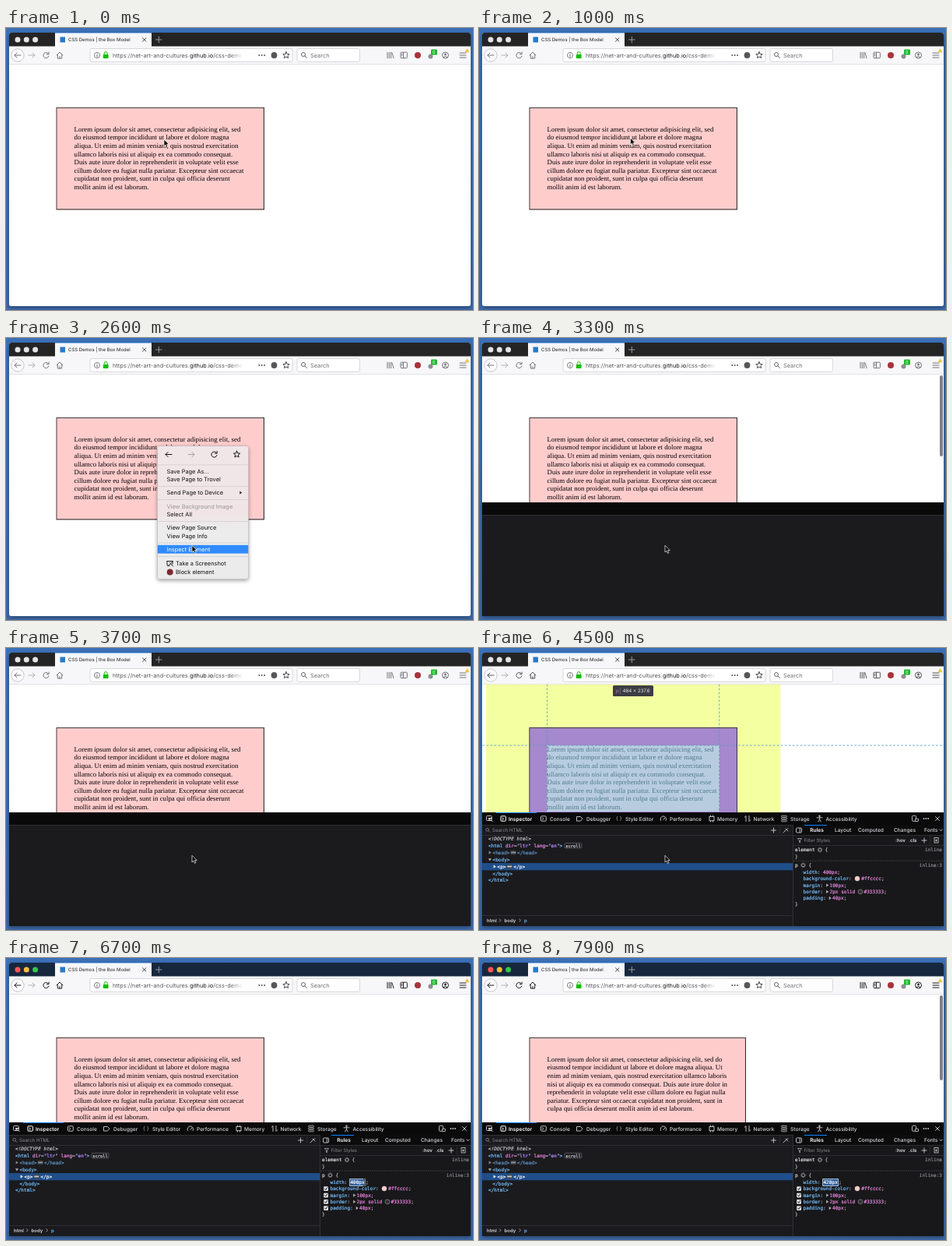
Animation, 600 px wide and 362 px high, one loop 8000 ms. Source, as an HTML page:

```html
<!DOCTYPE html>
<html lang="en">
<head>
<meta charset="utf-8">
<title>Box model inspector</title>
<style>
html, body { margin: 0; width: 100%; height: 100%; overflow: hidden; background: #3d70b6; }
svg {
  display: block; width: 600px; height: 362px;
  --ink: #75757a; --bar: #242425; --close: #e4e4e6; --minimize: #e4e4e6; --zoom: #e4e4e6;
}
svg.ready { --ink: #55555a; }
svg.active { --ink: #1f1f23; --bar: #17283e; --close: #fc5652; --minimize: #fdbc3f; --zoom: #33c748; }
text { font-family: Inter, Roboto, sans-serif; white-space: pre; text-rendering: geometricPrecision; stroke-width: 0; }
.mono { font-family: "DejaVu Sans Mono", monospace; stroke-width: .2px; }
.line { fill: none; stroke-width: 1; stroke-linecap: round; stroke-linejoin: round; }
#para {
  width: 400px; padding: 40px; border: 2px solid #333; background: #fcc; color: #000;
  font: 16px/1.2 "Liberation Serif", Times, serif; text-rendering: geometricPrecision;
}
</style>
</head>
<body>
<svg id="stage" viewBox="0 0 600 362" xmlns="http://www.w3.org/2000/svg"></svg>
<script>
const LOOP = 8000;
const MENU = [1300, 2700], PANEL = 2800, READY = 3900, OVERLAY = [4000, 5200];
const CHECKS = 5700, EDIT = 6400, TYPING = 6900, REPEAT = 7300;

const stage = document.getElementById('stage');
const $ = id => document.getElementById(id);

const text = (x, mid, str, size, fill, extra = '') =>
  `<text x="${x}" y="${mid + size * .36}" font-size="${size}" fill="${fill}" ${extra}>${str}</text>`;
const rect = (x, y, w, h, fill, extra = '') =>
  `<rect x="${x}" y="${y}" width="${w}" height="${h}" fill="${fill}" ${extra}/>`;
const dot = (x, y, r, fill, extra = '') => `<circle cx="${x}" cy="${y}" r="${r}" fill="${fill}" ${extra}/>`;
const line = (d, color, extra = '') => `<path class="line" d="${d}" stroke="${color}" ${extra}/>`;
const group = (id, body, extra = '') => `<g id="${id}" ${extra}>${body}</g>`;
const mono = (x, mid, str, fill = '#b1b1b3', extra = '') =>
  text(x, mid, str, 6.08, fill, `class="mono" stroke="${fill}" ${extra}`);
const tint = (color, str) => `<tspan fill="${color}" stroke="${color}">${str}</tspan>`;
const tag = str => tint('#75bfff', str);
const pink = str => tint('#f086e2', str);
const at = (x, y, body) => `<g transform="translate(${x} ${y})">${body}</g>`;

const arrow = (x, y, dir, color) =>
  at(x, y, line(`M${-4 * dir} 0H${4 * dir}M${dir} -3L${4 * dir} 0L${dir} 3`, color));
const reload = (x, y, color) =>
  at(x, y, line('M3 -2A3.6 3.6 0 1 0 3.5 1M3.6 -4V-1.4H1', color));
const star = (x, y, color) => {
  const points = Array.from({ length: 10 }, (_, i) => {
    const a = i * Math.PI / 5 - Math.PI / 2, r = i % 2 ? 2 : 4.4;
    return `${(r * Math.cos(a)).toFixed(2)} ${(r * Math.sin(a)).toFixed(2)}`;
  });
  return at(x, y, line(`M${points.join('L')}Z`, color));
};
const lens = (x, y, s, color) =>
  at(x, y, `<g transform="scale(${s})">${dot(-1, -1, 2.5, 'none', `stroke="${color}"`)}${line('M1 1L3.5 3.5', color)}</g>`);
const gear = (x, y) => dot(x, y, 2, 'none', 'stroke="#a0a0a5" stroke-width="1"') +
  dot(x, y, 2.9, 'none', 'stroke="#a0a0a5" stroke-width=".8" stroke-dasharray="1 1.27"');
const twisty = (x, y, open, color = '#b1b1b3') =>
  `<path transform="translate(${x} ${y})" d="${open ? 'M-2 -1.3H2L0 1.8Z' : 'M-1.3 -2.2V2.2L1.8 0Z'}" fill="${color}"/>`;
const dots = (x, y, gap, color) => [-1, 0, 1].map(i => dot(x + i * gap, y, 1, color)).join('');

function browserChrome() {
  const ink = 'var(--ink)';
  return rect(4, 6, 593, 351, '#fff', 'rx="3" filter="url(#shadow)"') +
    `<path d="M4 25V9q0-3 3-3H594q3 0 3 3V25Z" fill="var(--bar)"/>` +
    ['close', 'minimize', 'zoom'].map((name, i) => dot(15 + i * 11.3, 15, 3.5, `var(--${name})`)).join('') +
    rect(63, 6, 124, 18.5, '#f7f7f9') + rect(63, 6, 124, 1, '#8fbdf0') +
    rect(69.5, 11.5, 6.5, 7, '#2879c9') +
    text(80, 15, 'CSS Demos | the Box Model', 6, '#1c1c1f') +
    line('M175.5 12.8L180 17.2M180 12.8L175.5 17.2', '#444', 'stroke-width=".9"') +
    line('M192.5 15H200M196.3 11.2V18.8', '#96989c') +
    rect(4, 23.5, 593, 23, '#f7f7f9') + rect(4, 46, 593, .6, '#d4d4d8') +
    dot(15, 35, 8.2, '#fcfcfd', 'stroke="#bcbcc2" stroke-width=".8"') + arrow(15, 35, -1, ink) +
    arrow(33, 35, 1, '#b0b0b5') + reload(51.5, 35, ink) +
    line('M65 35L69 31L73 35M66.3 34.5V39H71.7V34.5M69 39V36.5', ink) +
    rect(108, 26.5, 260, 16.8, '#fff', 'rx="2" stroke="#cfcfd4" stroke-width=".8"') +
    dot(117, 35, 3.6, 'none', 'stroke="#74747a" stroke-width=".9"') + line('M117 34.7V37M117 33V33.1', '#66666c') +
    line('M126.2 34V32.5a2 2 0 0 1 4 0V34', '#12bc00', 'stroke-width="1.2"') + rect(124.8, 34, 6.8, 5, '#12bc00', 'rx=".8"') +
    `<g clip-path="url(#urlClip)">` +
    text(137, 35, `https://net-art-and-cultures.${tint('#1c1c20', 'github.io')}/css-demos`, 7.4, '#58585e') + `</g>` +
    rect(288, 28, 17, 14, 'url(#fade)') +
    dots(328.7, 35, 3.4, '#55555a') + dot(344.5, 35, 3.9, '#55555a') + star(360, 35, '#4a4a50') +
    rect(374, 26.5, 80.5, 16.8, '#fff', 'rx="2" stroke="#cfcfd4" stroke-width=".8"') +
    lens(383, 35, 1, '#66666c') + text(391, 35, 'Search', 7.4, '#707076') +
    line('M490 31.3V38.7M492.3 31.3V38.7M494.6 31.3V38.7M496 31.8L498 38.7', ink, 'stroke-width="1.1"') +
    rect(507, 31.2, 8.4, 7.4, 'none', `rx="1" stroke="${ink}" stroke-width="1"`) + line('M510.5 31.5V38.5M508.2 33.5H509M508.2 35.3H509', ink) +
    dot(529, 35, 4, '#a8323a') +
    dot(545.5, 36.5, 3, '#8e8e93') + rect(546, 27.5, 8, 7, '#1fb82c', 'rx="1"') + text(548, 31, '0', 5.5, '#fff') +
    dot(564.5, 35, 4, 'none', `stroke="${ink}" stroke-width="1"`) + dot(564.5, 34, 1.4, ink) + line('M562.2 37.4q2.3-2 4.6 0', ink) +
    line('M583 32H591M583 35H591M583 38H591', ink, 'stroke-width="1.1"') +
    `<path d="M592.5 26L595.5 31.3H589.5Z" fill="#f2c343"/>`;
}

const lorem = 'Lorem ipsum dolor sit amet, consectetur adipisicing elit, sed do eiusmod tempor incididunt ut labore et dolore magna aliqua. Ut enim ad minim veniam, quis nostrud exercitation ullamco laboris nisi ut aliquip ex ea commodo consequat. Duis aute irure dolor in reprehenderit in voluptate velit esse cillum dolore eu fugiat nulla pariatur. Excepteur sint occaecat cupidatat non proident, sunt in culpa qui officia deserunt mollit anim id est laborum.';

// Page contents are laid out in CSS pixels and scaled down.
function page() {
  const box = (x, y, w, h) => `M${x} ${y}h${w}v${h}h${-w}Z`;
  const rings = [box(8, 0, 684, 437.6), box(108, 100, 484, 237.6), box(110, 102, 480, 233.6), box(150, 142, 400, 153.6)];
  const fills = ['#edff64', '#444', '#6a5acd', '#87ceeb'];
  const overlay = rings.map((d, i) =>
    `<path d="${d}${rings[i + 1] || ''}" fill="${fills[i]}" fill-rule="evenodd"/>`).join('') +
    `<path d="M150 0V300M550 0V300M0 142H1074" fill="none" stroke="#0077b8" stroke-width="1.8" stroke-dasharray="5 4"/>`;
  return `<g clip-path="url(#pageClip)"><g transform="translate(4.6 46.5) scale(.553)">
    <foreignObject x="108" y="100" width="700" height="400"><div xmlns="http://www.w3.org/1999/xhtml" id="para">${lorem}</div></foreignObject>
    ${group('overlay', overlay, 'opacity=".6"')}</g></g>` +
    group('tip', rect(172, 48, 52, 14, '#3c3d42', 'rx="1.5"') + text(176, 55, 'p', 6.2, '#d36ee0') +
      rect(181, 51, .6, 8, '#77777c') + text(184.5, 55, '484 × 237.6', 6.2, '#eee')) +
    rect(592, 48, 4, 104, '#808084', 'id="thumb" rx="2"');
}

const menuRows = [
  [171, 'Save Page As…'], [181.6, 'Save Page to Trovel'], [198.6, 'Send Page to Device'],
  [216, 'View Background Image', 'off'], [226.5, 'Select All'], [243.6, 'View Page Source'],
  [254.2, 'View Page Info'], [271.2, 'Inspect Element'], [289, 'Take a Screenshot', 'icon'], [300.5, 'Block element', 'icon']
];

function menu() {
  const rows = menuRows.map(([y, label, kind], i) =>
    rect(194.8, y - 5.4, 116.4, 10.8, '#2f8bff', `id="hot${i}"`) +
    text(kind === 'icon' ? 218 : 206.5, y, label, 7.4, kind === 'off' ? '#98959a' : '#111', `id="row${i}"`)).join('');
  const rules = [162.5, 190, 207, 235, 262.6, 280].map(y => rect(195, y, 116, .8, '#d2ced1')).join('');
  return rect(194.5, 138.5, 117, 171, 'url(#menuFill)', 'rx="3" stroke="#b5b0b3" stroke-width=".6" filter="url(#shadow)"') +
    arrow(209, 149.5, -1, '#111') + arrow(238, 149.5, 1, '#a5a0a4') + reload(267.5, 149.5, '#111') + star(296.5, 149.5, '#111') +
    rules + rows + twisty(301.5, 198.6, false, '#333') +
    line('M207 286.5H214V290M207 286.5V292H210M208.5 293L214.5 286.5M210.5 288.5L214.5 293', '#222') +
    dot(210.7, 300.5, 4, '#7d2a30');
}

function toolbox() {
  const soft = '#d7d7db', icon = '#bcbcc0';
  const tabs = [[91, 'Console'], [138, 'Debugger'], [188, 'Style Editor'], [245, 'Performance'],
    [306, 'Memory'], [352.5, 'Network'], [400, 'Storage'], [445.5, 'Accessibility']];
  const tabIcons = rect(9.5, 215.5, 7, 6, 'none', `rx="1" stroke="${icon}"`) + line('M13 218.5L17 222.5M13 218.5V221.5M13 218.5H16', '#fff') +
    rect(28, 215.8, 6.4, 6.4, 'none', 'rx="1" stroke="#fff"') + line('M30 218L31.5 219.2L30 220.5', '#fff') +
    rect(79.5, 215.8, 6.8, 6.4, 'none', `rx="1" stroke="${icon}"`) + line('M81.3 217.8L83 219.2L81.3 220.6', icon) +
    `<path d="M125.5 216.5H130.5L133 219.2L130.5 222H125.5Z" fill="none" stroke="${icon}"/>` +
    text(176, 219, '{ }', 6.6, icon) +
    line('M233.5 221.5A3.8 3.8 0 1 1 240.2 221.5M237 220.5L239 217.8', icon) +
    rect(296, 216.5, 6, 5.2, 'none', `stroke="${icon}"`) + line('M297.5 215V216M300.5 215V216M297.5 222V223M300.5 222V223', icon) +
    line('M343 222.5V215.5L341.3 217.2M347 215.5V222.5L348.7 220.8', icon) +
    [216.2, 219, 221.8].map(y => rect(388.5, y - 1, 7, 2, 'none', `rx="1" stroke="${icon}" stroke-width=".8"`)).join('') +
    dot(437.5, 215.7, 1.2, icon) + line('M434 217.8H441M437.5 218V220L435.7 223M437.5 220L439.3 223', icon);
  const header = rect(22, 211, 52, 1, '#0a84ff') + tabIcons +
    text(38, 219.2, 'Inspector', 6.6, '#fff', 'font-weight="600"') +
    tabs.map(([x, label]) => text(x, 219.2, label, 6.6, soft, 'font-weight="500"')).join('') +
    rect(556.5, 215.3, 5, 7, 'none', `rx="1" stroke="${icon}"`) + rect(560.5, 219.3, 4, 3.2, '#0a0a0b', `rx=".6" stroke="${icon}"`) +
    dots(574.3, 219, 2.8, icon) + line('M586.5 216.5L591.5 221.5M591.5 216.5L586.5 221.5', icon);

  const badge = (x, y) => rect(x, y - 2.6, 7.4, 5.2, '#4a4a50', 'rx="1"') + dots(x + 3.7, y, 1.9, '#ddd');
  const tree = rect(4, 240, 399, .7, '#38383d') + lens(11.5, 234, .75, '#8a8a90') + text(17, 233.8, 'Search HTML', 6.1, '#8a8a90') +
    line('M375.5 234H381.5M378.5 231V237', icon) + rect(386, 229, .6, 9, '#38383d') +
    line('M391 237L394.5 233.5', icon) + line('M394 232L397 235M395.5 233L396.8 231.7', icon, 'stroke-width="1.7"') +
    mono(12, 244.9, '&lt;!DOCTYPE html&gt;', '#c9c9cd', 'font-style="italic"') +
    mono(12, 253.6, `${tag('&lt;html')} ${pink('dir')}=${tint('#b98eff', '"ltr"')} ${pink('lang')}=${tint('#b98eff', '"en"')}${tag('&gt;')}`) +
    rect(110, 250.4, 22, 6.6, 'none', 'rx="1.5" stroke="#77777c" stroke-width=".6"') + mono(111.2, 253.6, 'scroll', '#d7d7db', 'style="font-size:5.4px"') +
    `<g opacity=".72">${twisty(14, 262.6)}${mono(17.5, 262.6, tag('&lt;head&gt;'))}${badge(40.5, 262.6)}${mono(49, 262.6, tag('&lt;/head&gt;'))}</g>` +
    twisty(14, 271.6, true) + mono(17.5, 271.6, tag('&lt;body&gt;')) +
    rect(4, 276.1, 399, 9.2, '#204e8a') + twisty(20, 280.6, false, '#fff') + mono(23.5, 280.6, '&lt;p&gt;', '#fff') + badge(35.5, 280.6) + mono(44.5, 280.6, '&lt;/p&gt;', '#fff') +
    mono(17.5, 289.4, tag('&lt;/body&gt;')) + mono(12, 298.1, tag('&lt;/html&gt;')) +
    rect(4, 343, 399, .7, '#38383d') +
    [[10, 'html', soft], [32.5, 'body', soft], [58, 'p', '#75bfff']].map(([x, s, c]) => text(x, 349.5, s, 6, c, 'font-weight="600"')).join('') +
    [26.5, 52].map(x => line(`M${x} 347.8L${x + 1.5} 349.5L${x} 351.2`, '#a0a0a5', 'stroke-width=".8"')).join('');

  const sideTabs = [[457, 'Layout'], [487, 'Computed'], [533, 'Changes'], [572, 'Fonts']];
  const prop = (y, name) => mono(416.5, y, `${tag(name)}:`);
  const rules = rect(403, 227, 194, 130, '#18181a') + rect(404, 227, 193, 13, '#0c0c0d') +
    rect(403, 227, .8, 130, '#38383d') + rect(404, 240, 193, .7, '#38383d') + rect(404, 253, 193, .7, '#38383d') +
    rect(418, 227, 29, 1, '#0a84ff') +
    rect(407.5, 231, 7, 6, 'none', `rx="1" stroke="${icon}"`) + line('M412.3 231.5V236.5', icon) +
    text(425.3, 234, 'Rules', 6.6, '#fff', 'font-weight="600"') +
    sideTabs.map(([x, s]) => text(x, 234, s, 6.6, soft, 'font-weight="500"')).join('') +
    line('M592 233L593.6 234.8L595.2 233', icon, 'stroke-width=".9"') +
    line('M409.5 244.5H414.5L412.6 247V250L411.4 249.3V247Z', '#8a8a90', 'stroke-width=".8"') + text(417.5, 247, 'Filter Styles', 6, '#8a8a90') +
    text(535, 247, ':hov', 6.1, '#e4e4e6', 'font-weight="600"') + text(552, 247, '.cls', 6.1, '#e4e4e6', 'font-weight="600"') +
    line('M569 247H575M572 244V250', icon) + rect(579, 242, .6, 10, '#38383d') +
    rect(585, 243.5, 5, 6.5, 'none', `stroke="${icon}" stroke-width=".9"`) + line('M586.5 247H588.5M587.5 246V248', icon, 'stroke-width=".7"') +
    mono(406, 259.3, 'element', soft) + gear(438, 259.1) + mono(444.5, 259.3, '{') + mono(595, 259.3, 'inline', '#86868c', 'text-anchor="end"') + mono(406, 267.5, '}') +
    `<path d="M404 273.2H597" stroke="#45454a" stroke-width=".8" stroke-dasharray="2 1"/>` +
    mono(406, 279, 'p', soft) + gear(416.5, 278.8) + mono(423.5, 279, '{') + mono(595, 279, 'inline:3', '#86868c', 'text-anchor="end"') +
    prop(288, 'width') +
    group('value', mono(442, 288, `${pink('400px')};`)) +
    group('editor', rect(441.7, 283.7, 20, 8.8, '#2f609f', 'stroke="#d3dde9" stroke-width=".8"') +
      mono(442.4, 288, '400px', '#fff', 'id="typed"') + mono(462.3, 288, ';')) +
    prop(296.2, 'background-color') + dot(486, 296, 3, '#fcc', 'stroke="#ddd" stroke-width=".5"') + mono(491.3, 296.2, `${pink('#ffcccc')};`) +
    prop(304.6, 'margin') + twisty(447.5, 304.6) + mono(450.5, 304.6, `${pink('100px')};`) +
    prop(312.9, 'border') + twisty(447.5, 312.9) + mono(450.5, 312.9, pink('2px solid')) + dot(490, 312.9, 3, '#333', 'stroke="#99999d" stroke-width=".6"') + mono(494.5, 312.9, `${pink('#333333')};`) +
    prop(321.1, 'padding') + twisty(451, 321.1) + mono(454, 321.1, `${pink('40px')};`) + mono(406, 329, '}');
  const check = y => rect(408.2, y - 2.9, 5.8, 5.8, '#e0e0e4', 'rx="1"') + line(`M409.6 ${y}L410.8 ${y + 1.3}L412.8 ${y - 1.5}`, '#222');
  const checks = group('checks', [296.2, 304.6, 312.9, 321.1].map(check).join('') + group('widthCheck', check(288)));

  return group('panel', rect(4, 211, 593, 146, '#1b1b1e') + rect(4, 211, 593, 16, '#0a0a0b') + rect(4, 227, 593, .7, '#3b3b38') +
    group('tools', header + tree + rules + checks));
}

const beam = 'M-1.5 -4.5Q0 -4.5 0 -3.3Q0 -4.5 1.5 -4.5M0 -3.5V3.5M-1.5 4.5Q0 4.5 0 3.3Q0 4.5 1.5 4.5';

stage.innerHTML = `<defs>
  <linearGradient id="desk" x2="0" y2="1"><stop stop-color="#3b70b8"/><stop offset="1" stop-color="#3e69a8"/></linearGradient>
  <linearGradient id="fade"><stop stop-color="#fff" stop-opacity="0"/><stop offset="1" stop-color="#fff"/></linearGradient>
  <linearGradient id="menuFill" x2="0" y2="1"><stop stop-color="#f0e6e8"/><stop offset=".5" stop-color="#f0e4e6"/><stop offset=".62" stop-color="#ececed"/><stop offset="1" stop-color="#ebebec"/></linearGradient>
  <filter id="shadow" x="-15%" y="-15%" width="130%" height="130%"><feDropShadow dx="0" dy="2" stdDeviation="2.5" flood-opacity=".35"/></filter>
  <clipPath id="pageClip"><rect x="4" y="46.5" width="593" height="310"/></clipPath>
  <clipPath id="urlClip"><rect x="136" y="28" width="167" height="14"/></clipPath></defs>` +
  rect(0, 0, 600, 362, 'url(#desk)') + browserChrome() + page() + toolbox() + group('menu', menu()) +
  group('pointer', '<path d="M0 0V8.6L2 6.9L3.4 10L4.9 9.3L3.6 6.3H6.2Z" fill="#000" stroke="#fff" stroke-width=".7"/>') +
  group('beam', line(beam, '#fff', 'stroke-width="1.8"') + line(beam, '#111', 'stroke-width=".8"'));

const path = [[0, 203, 143], [200, 203, 143], [900, 194.5, 141], [1900, 194.5, 141], [2500, 239, 266.3],
  [4700, 239, 266.3], [5400, 420, 263], [5500, 420, 263], [6200, 461, 288]];

function pointerAt(t) {
  const i = path.findIndex(k => k[0] > t);
  if (i < 0) return path[path.length - 1].slice(1);
  const [t0, x0, y0] = path[i - 1], [t1, x1, y1] = path[i];
  const u = (t - t0) / (t1 - t0), e = u * u * (3 - 2 * u);
  return [x0 + (x1 - x0) * e, y0 + (y1 - y0) * e];
}

function widthAt(t) {
  if (t < TYPING) return 400;
  if (t < REPEAT) return 401;
  return Math.min(420, 402 + Math.floor((t - REPEAT) / 31));
}

const show = (id, on) => { $(id).style.display = on ? '' : 'none'; };
const within = (t, [a, b]) => t >= a && t < b;

function draw(t) {
  const [x, y] = pointerAt(t), width = widthAt(t);
  stage.classList.toggle('ready', t >= READY);
  stage.classList.toggle('active', t >= EDIT);
  $('para').style.width = width + 'px';
  $('typed').textContent = width + 'px';

  show('menu', within(t, MENU));
  menuRows.forEach(([mid, , kind], i) => {
    const hot = kind !== 'off' && x > 195 && Math.abs(y - mid) < 5.4;
    show('hot' + i, hot);
    $('row' + i).style.fill = hot ? '#fff' : '';
  });

  // The scrollbar flashes whenever the scrollable height changes.
  const shorter = $('para').offsetHeight < 230;
  show('thumb', within(t, [PANEL, 3600]) || shorter);
  $('thumb').setAttribute('height', shorter ? 109 : 104);

  show('panel', t >= PANEL);
  show('tools', t >= READY);
  show('overlay', within(t, OVERLAY));
  show('tip', within(t, OVERLAY));
  show('checks', t >= CHECKS);
  show('widthCheck', t < EDIT);
  show('value', t < EDIT);
  show('editor', t >= EDIT);

  const overValue = t >= 6150;
  show('pointer', !overValue);
  show('beam', overValue && t < TYPING);
  for (const id of ['pointer', 'beam']) $(id).setAttribute('transform', `translate(${x} ${y})`);
}

const start = performance.now();
function tick() {
  draw((performance.now() - start) % LOOP);
  requestAnimationFrame(tick);
}
tick();
</script>
</body>
</html>
```
